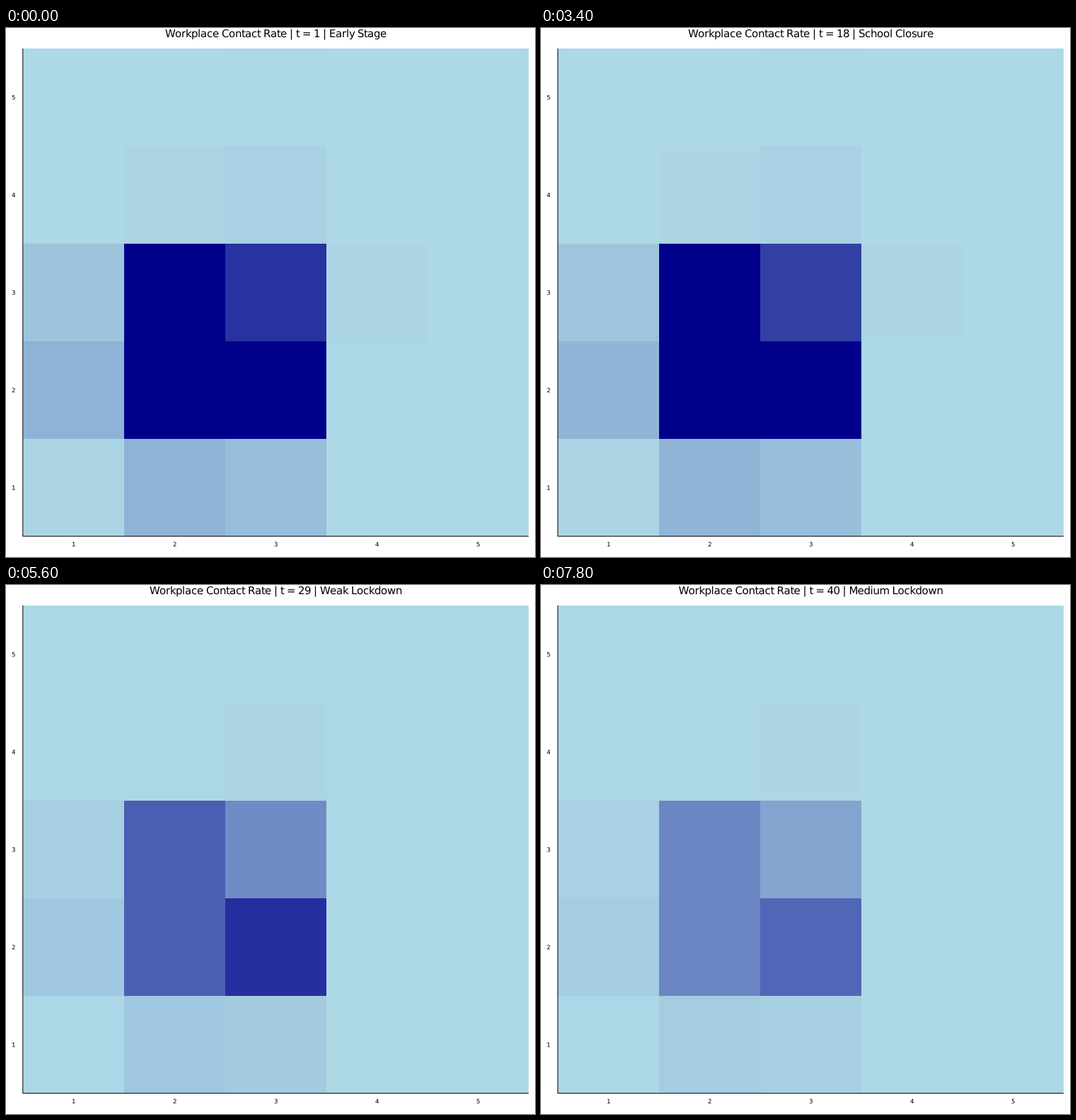
Animation, 748 px wide and 748 px high, one loop 8000 ms. Source, as a matplotlib script:

```python
import math

import matplotlib.pyplot as plt
import numpy as np
from matplotlib.animation import FuncAnimation
from matplotlib.colors import LinearSegmentedColormap
from matplotlib.patches import PathPatch
from matplotlib.path import Path
from matplotlib.textpath import TextPath

SIZE = 748
DAYS = 40
STEP_MS = 200
LEFT, RIGHT, TOP, BOTTOM = 24, 739, 29, 719
TITLE_PX, TICK_PX = 15, 8.6

# Contact rates by age group, first row at the bottom of the map
RATES = np.array([
    [0.013, 0.175, 0.125, 0.000, 0.000],
    [0.175, 1.233, 1.712, 0.006, 0.000],
    [0.095, 1.233, 0.769, 0.012, 0.000],
    [0.000, 0.012, 0.033, 0.000, 0.000],
    [0.000, 0.002, 0.006, 0.000, 0.000],
])
WEEK_SCALE = [1.0, 1.015, 0.82, 0.917, 0.459, 0.42, 0.31]
STAGES = [(38, "Medium Lockdown"), (24, "Weak Lockdown"),
          (10, "School Closure"), (1, "Early Stage")]

plt.rcParams["font.family"] = "DejaVu Sans"
plt.rcParams["toolbar"] = "None"


def advance(char, px):
    """Glyph advance, cut to whole pixels for tight spacing."""
    bar = TextPath((0, 0), "|", size=px).get_extents().x1
    pair = TextPath((0, 0), char + "|", size=px).get_extents().x1
    return math.floor(pair - bar)


def text_path(text, cx, baseline, px):
    """Outline of a text centred on cx, in pixels from the top left."""
    widths = {c: advance(c, px) for c in set(text)}
    x = cx - sum(widths[c] for c in text) / 2
    glyphs = []
    for char in text:
        if char != " ":
            glyph = TextPath((0, 0), char, size=px)
            glyphs.append(Path(glyph.vertices + [x, SIZE - baseline], glyph.codes))
        x += widths[char]
    return Path.make_compound_path(*glyphs)


def add_text(*args):
    patch = PathPatch(text_path(*args), facecolor="black", linewidth=0)
    return ax.add_patch(patch)


def heat(day):
    return np.clip(RATES * WEEK_SCALE[(day + 4) // 7], 0, 1)


def title_path(day):
    stage = next(name for start, name in STAGES if day >= start)
    text = f"Workplace Contact Rate | t = {day} | {stage}"
    return text_path(text, (LEFT + RIGHT) / 2, 13, TITLE_PX)


fig = plt.figure(figsize=(SIZE / 100, SIZE / 100), dpi=100, facecolor="white")
ax = fig.add_axes([0, 0, 1, 1])
ax.set_axis_off()

blues = LinearSegmentedColormap.from_list("blues", ["lightblue", "darkblue"])
xs = np.linspace(LEFT, RIGHT, 6)
ys = SIZE - np.linspace(BOTTOM, TOP, 6)
mesh = ax.pcolormesh(xs, ys, heat(1), cmap=blues, vmin=0, vmax=1,
                     antialiased=False, edgecolors="none")

axis_style = dict(color="black", linewidth=0.72, snap=False,
                  solid_capstyle="butt")
ax.plot([LEFT - 0.2] * 2, [SIZE - TOP, SIZE - BOTTOM], **axis_style)
ax.plot([LEFT, RIGHT], [SIZE - BOTTOM + 0.3] * 2, **axis_style)

for i in range(5):
    label = str(i + 1)
    add_text(label, (xs[i] + xs[i + 1]) / 2, 733, TICK_PX)
    add_text(label, 10.5, SIZE - (ys[i] + ys[i + 1]) / 2 + 3.2, TICK_PX)

title = add_text("t", 0, 0, TITLE_PX)
ax.set_xlim(0, SIZE)
ax.set_ylim(0, SIZE)


def draw(frame):
    day = frame + 1
    mesh.set_array(heat(day))
    title.set_path(title_path(day))
    return mesh, title


anim = FuncAnimation(fig, draw, frames=DAYS, interval=STEP_MS,
                     repeat=True, repeat_delay=0, blit=False)
plt.show()
```
